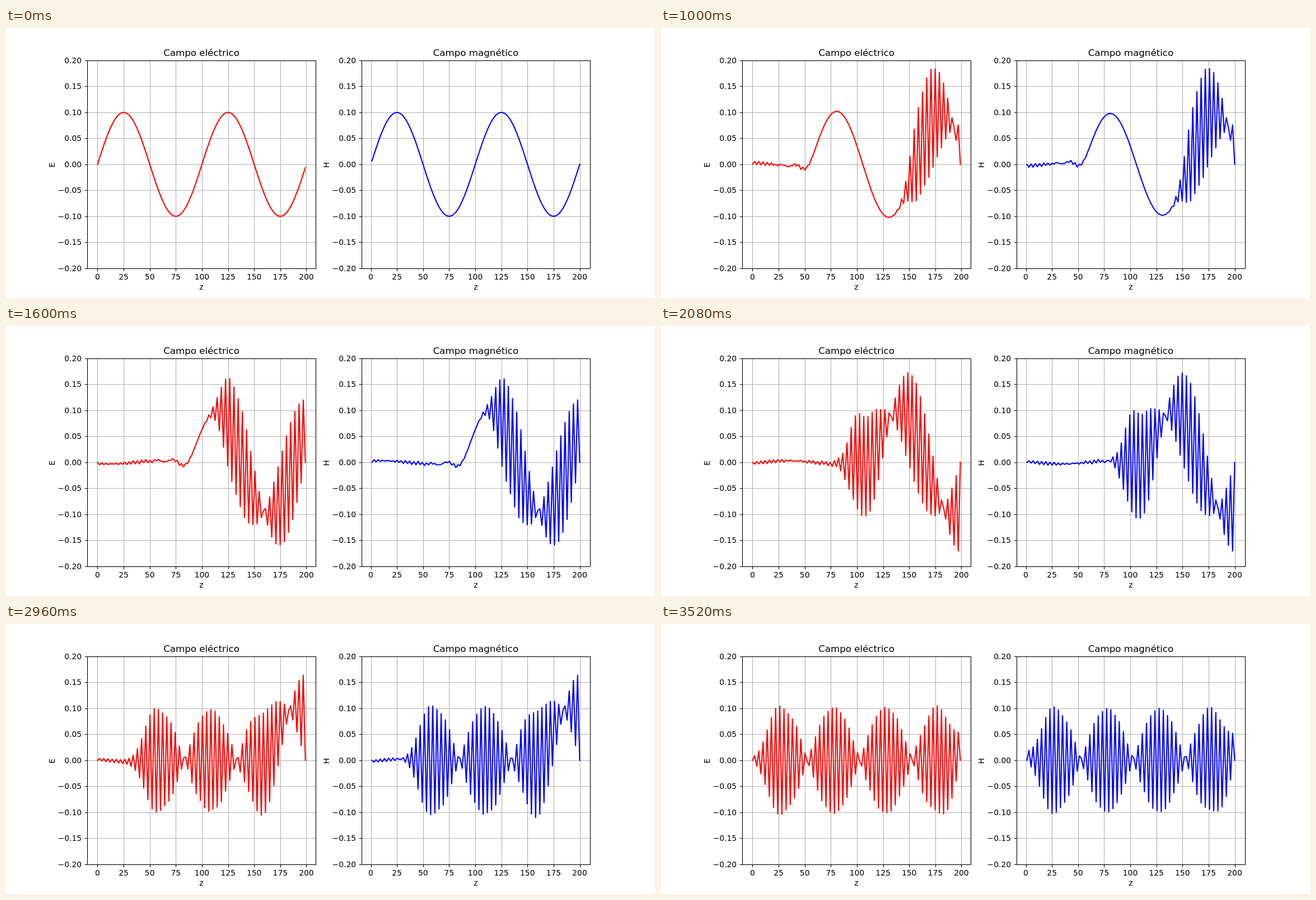
Recreate the animation shown at these times as an HTML page. Size 1159x483 px, loop 3.56 s.

```html
<!DOCTYPE html>
<html lang="es">
<head>
<meta charset="utf-8">
<title>Campos</title>
<style>
  html, body { margin: 0; width: 100%; height: 100%; overflow: hidden; background: #fff; }
  svg { display: block; width: 1159px; height: 483px; }
  text { font: 13.889px "DejaVu Sans", sans-serif; fill: #000; text-anchor: middle; }
  .title { font-size: 16.667px; }
  .end { text-anchor: end; }
  .grid { stroke: #b0b0b0; stroke-width: 1.111; fill: none; }
  .axis { stroke: #000; stroke-width: 1.111; fill: none; stroke-linecap: butt; }
  .frame { stroke: #000; stroke-width: 1.111; fill: none; }
  .curve { stroke-width: 2.083; fill: none; stroke-linejoin: round; stroke-linecap: square; }
</style>
</head>
<body>
<svg id="stage" viewBox="0 0 1159 483" xmlns="http://www.w3.org/2000/svg"></svg>
<script>
const FRAMES = 89, FRAME_MS = 40, SUBSTEPS = 2;
const N = 100, SPAN = 199, COURANT = 5 / 9;
const TOP = 57.96, BOTTOM = 429.87, WIDTH = 408.28;
const stage = document.getElementById('stage');

const snap = v => Math.floor(v + 0.5) + 0.5;
const yAt = v => (TOP + BOTTOM) / 2 - v * (BOTTOM - TOP) / 0.4;

function add(tag, attrs, text) {
  const el = document.createElementNS(stage.namespaceURI, tag);
  for (const k in attrs) el.setAttribute(k, attrs[k]);
  if (text !== undefined) el.textContent = text;
  stage.appendChild(el);
  return el;
}

function makePlot(left, z0, title, name, color) {
  const margin = SPAN * 0.05, scale = WIDTH / (SPAN + 2 * margin);
  const xAt = z => left + (z - z0 + margin) * scale;
  const x1 = snap(left), x2 = snap(left + WIDTH), y1 = snap(TOP), y2 = snap(BOTTOM);
  const mid = left + WIDTH / 2;
  let grid = '', ticks = '';

  for (let z = 0; z <= 200; z += 25) {
    const x = snap(xAt(z));
    grid += `M${x} ${y1}V${y2}`;
    ticks += `M${x} ${y2}v4.86`;
    add('text', { x: xAt(z), y: 450 }, z);
  }
  for (let i = -4; i <= 4; i++) {
    const v = i * 0.05, y = snap(yAt(v));
    grid += `M${x1} ${y}H${x2}`;
    ticks += `M${x1} ${y}h-4.86`;
    const label = (i < 0 ? '\u2212' : '') + Math.abs(v).toFixed(2);
    add('text', { x: left - 9.72, y: yAt(v) + 5, class: 'end' }, label);
  }

  add('path', { d: grid, class: 'grid' });
  const curve = add('path', { class: 'curve', stroke: color });
  add('path', { d: ticks, class: 'axis' });
  add('rect', { x: x1, y: y1, width: x2 - x1, height: y2 - y1, class: 'frame' });
  add('text', { x: mid, y: 50, class: 'title' }, title);
  add('text', { x: mid, y: 468 }, 'z');
  add('text', { transform: `translate(${left - 57.5} 245) rotate(-90)` }, name);

  const toPath = field => 'M' + field.map((v, j) =>
    xAt(z0 + j * SPAN / (N - 1)).toFixed(2) + ' ' + yAt(v).toFixed(2)).join('L');
  return { curve, toPath };
}

// One central-difference step; both ends are held at zero.
const advance = (base, other, k) => base.map((v, j) =>
  j === 0 || j === N - 1 ? 0 : v - k * (other[j + 1] - other[j - 1]));

function simulate() {
  const wave = z0 => Array.from({ length: N }, (_, j) =>
    0.1 * Math.sin(2 * Math.PI * (z0 + j * SPAN / (N - 1)) / 100));
  let e = wave(0), h = wave(1), ePrev, hPrev;
  const states = [];
  for (let n = 0; n < FRAMES * SUBSTEPS; n++) {
    if (n % SUBSTEPS === 0) states.push([e, h]);
    // Leapfrog in time, started with a single Euler step.
    const k = n ? COURANT : COURANT / 2;
    const eNext = advance(n ? ePrev : e, h, k);
    const hNext = advance(n ? hPrev : h, e, k);
    [ePrev, hPrev, e, h] = [e, h, eNext, hNext];
  }
  return states;
}

const plots = [
  makePlot(144.875, 0, 'Campo eléctrico', 'E', '#f00'),
  makePlot(634.82, 1, 'Campo magnético', 'H', '#00f')
];
const paths = simulate().map(state => state.map((field, i) => plots[i].toPath(field)));

let shown = -1;
function show(n) {
  if (n === shown) return;
  shown = n;
  plots.forEach((p, i) => p.curve.setAttribute('d', paths[n][i]));
}

show(0);
const start = performance.now();
function tick() {
  const t = Math.max(0, performance.now() - start);
  show(Math.floor(t / FRAME_MS) % FRAMES);
  requestAnimationFrame(tick);
}
requestAnimationFrame(tick);
</script>
</body>
</html>
```
